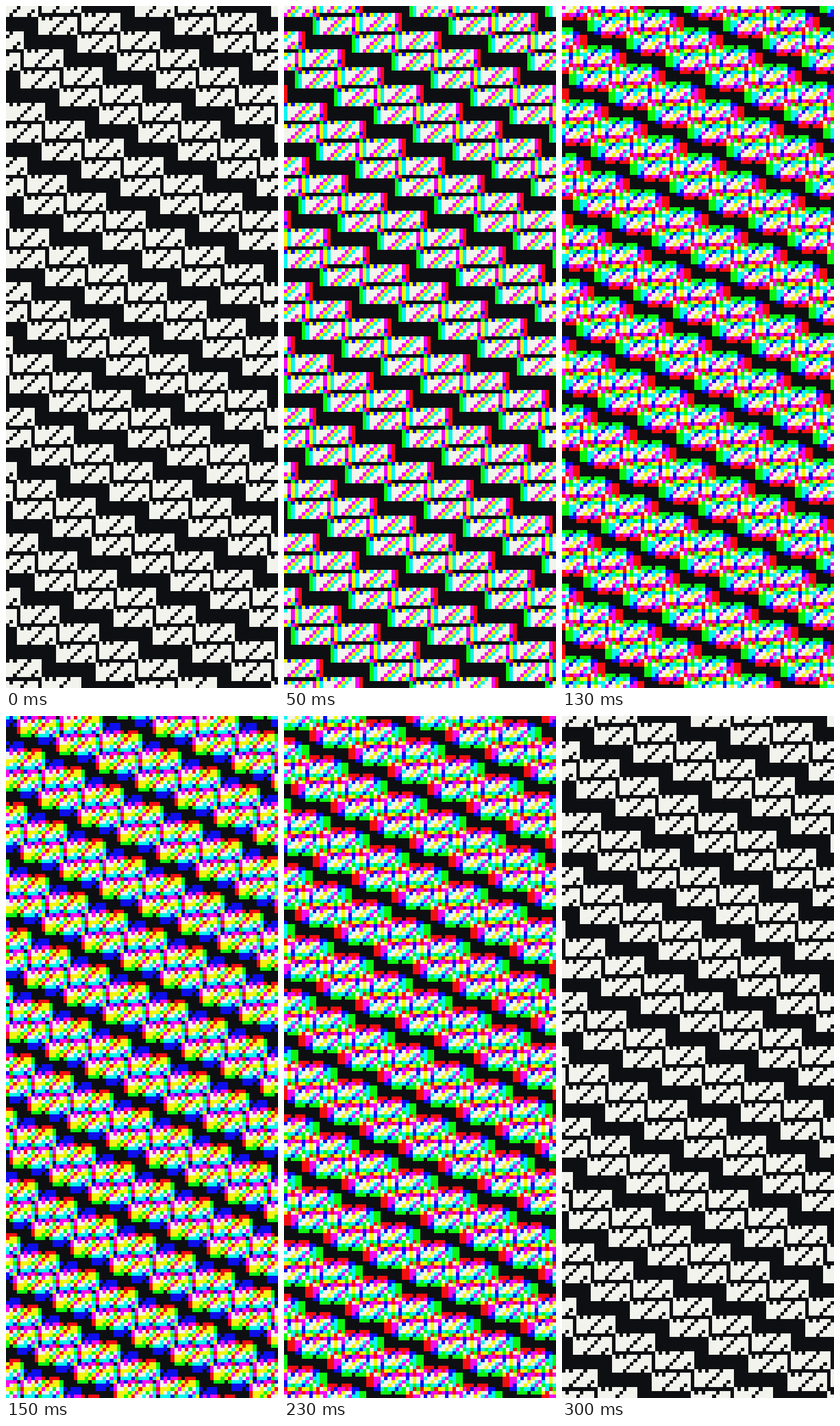
An HTML page with a canvas for the animation above (350 ms loop, 473 by 1183 pixels).

```html
<!DOCTYPE html>
<html lang="en">
<head>
<meta charset="utf-8">
<title>Brick pattern with drifting colour channels</title>
<style>
  html, body { margin: 0; width: 100%; height: 100%; overflow: hidden; background: #0e0f12; }
  canvas { display: block; width: 100vw; height: 100vh; image-rendering: pixelated; }
</style>
</head>
<body>
<canvas id="stage" width="76" height="190"></canvas>
<script>
const COLS = 76, ROWS = 190;
const PERIOD = 38, STEP_X = 11, STEP_Y = 5;
const STEP_MS = 50, STEPS = 7;
const DARK = [14, 15, 18], LIGHT = [242, 243, 236];

const BRICK = [
  '#.#.###.###',
  '######.####',
  '#####.#####',
  '####.####.#',
  '###.####.##'
];

const ctx = document.getElementById('stage').getContext('2d');
const image = ctx.createImageData(COLS, ROWS);
const mod = (a, n) => ((a % n) + n) % n;

// One brick, repeated along the lattice (38, 0), (11, 5).
function inBrick(x, y) {
  const row = Math.floor(y / STEP_Y);
  return BRICK[y - row * STEP_Y][mod(x - row * STEP_X, PERIOD)] === '#';
}

const lit = (x, y) => inBrick(x - 9, y - 3) || inBrick(x - 21, y - 2);

const easeInOut = p => p < 0.5 ? 2 * p * p : 1 - 2 * (1 - p) * (1 - p);
const roundDown = v => Math.ceil(v - 0.5 - 1e-9);

// Red travels one lattice step forwards, green one step backwards, blue rests.
function draw(step) {
  const p = easeInOut(step / (STEPS - 1));
  const dx = roundDown(STEP_X * p), dy = roundDown(STEP_Y * p);
  const signs = [1, -1, 0];
  let i = 0;
  for (let y = 0; y < ROWS; y++) {
    for (let x = 0; x < COLS; x++) {
      signs.forEach((s, c) => {
        image.data[i++] = (lit(x - s * dx, y - s * dy) ? LIGHT : DARK)[c];
      });
      image.data[i++] = 255;
    }
  }
  ctx.putImageData(image, 0, 0);
}

const start = performance.now();
let shown = -1;

function tick() {
  const elapsed = Math.max(0, performance.now() - start);
  const step = Math.floor(elapsed / STEP_MS) % STEPS;
  if (step !== shown) draw(shown = step);
  requestAnimationFrame(tick);
}
tick();
</script>
</body>
</html>
```
